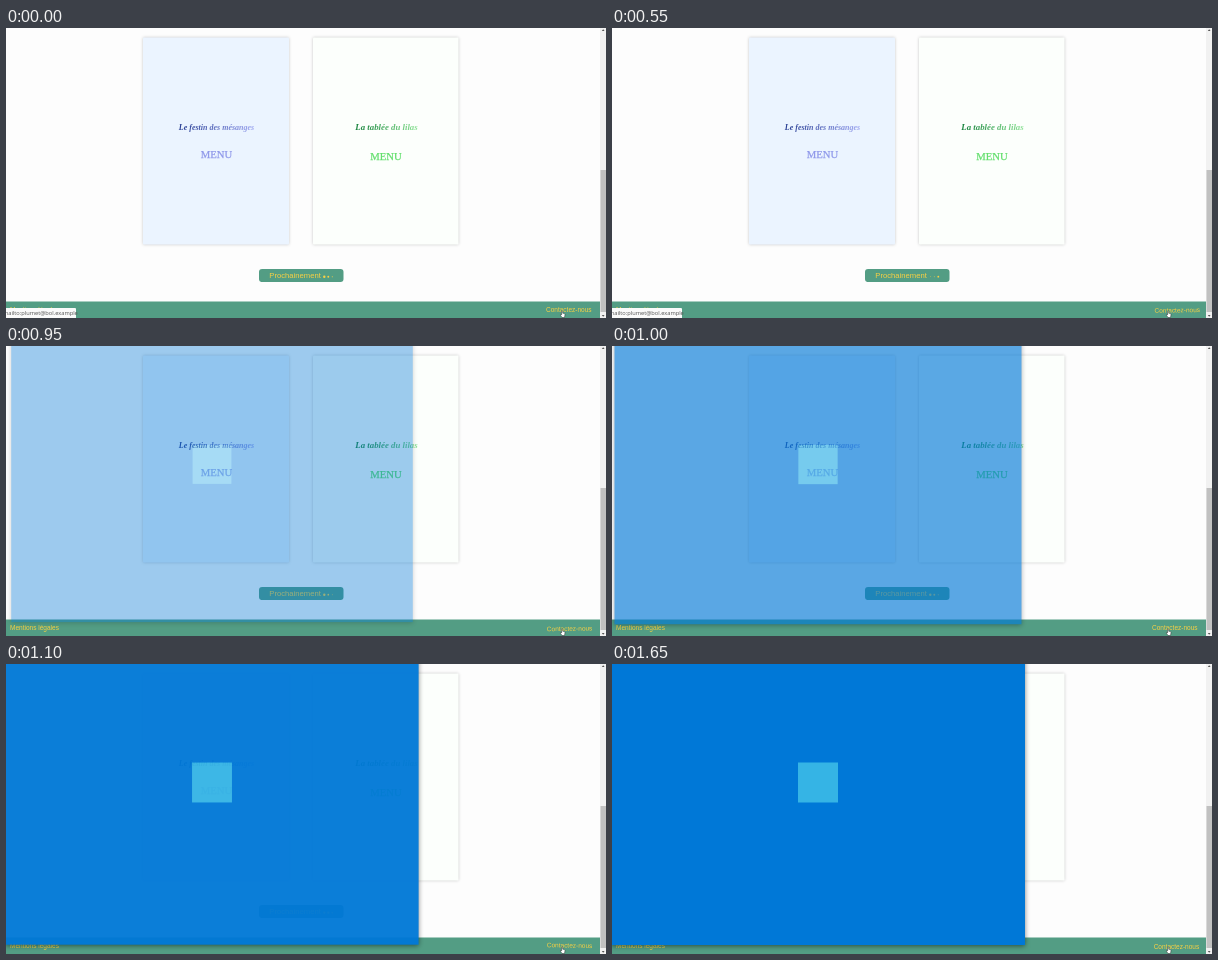
These frames come from a looping animation (600 by 290 pixels, 1700 ms). An HTML page:

```html
<!DOCTYPE html>
<html lang="fr">
<head>
<meta charset="utf-8">
<title>Menus</title>
<style>
  html, body { margin: 0; width: 100%; height: 100%; overflow: hidden; background: #fdfdfd; }
  svg { display: block; }
  text { font-family: "Liberation Sans", Arial, sans-serif; }
  .label { fill: #f8d043; }
  .name { font: italic bold 8px "Liberation Serif", serif; text-anchor: middle; }
  .menu { font: 10.7px "Liberation Serif", serif; text-anchor: middle; stroke-width: .25; }
  .card { filter: drop-shadow(0 0 1.5px rgba(0, 0, 0, .22)); }
  #popup rect:first-child { filter: drop-shadow(0 1px 2.5px rgba(0, 0, 0, .5)); }
</style>
</head>
<body>
<svg width="600" height="290" viewBox="0 0 600 290">
  <defs>
    <linearGradient id="blue"><stop stop-color="#263c91"/><stop offset="1" stop-color="#a0a9f2"/></linearGradient>
    <linearGradient id="green"><stop stop-color="#14803a"/><stop offset="1" stop-color="#92e59a"/></linearGradient>
  </defs>

  <rect class="card" x="137" y="9.5" width="146" height="207" rx="1" fill="#ebf4ff"/>
  <text class="name" x="210.5" y="102" fill="url(#blue)">Le festin des mésanges</text>
  <text class="menu" x="210.5" y="130" fill="#8f98ea" stroke="#8f98ea">MENU</text>

  <rect class="card" x="307" y="9.5" width="145.5" height="207" rx="1" fill="#fcfffc"/>
  <text class="name" x="380.5" y="102" style="font-size:8.8px" fill="url(#green)">La tablée du lilas</text>
  <text class="menu" x="380" y="132" fill="#62df6c" stroke="#62df6c">MENU</text>

  <rect x="253" y="241" width="84.5" height="13" rx="3" fill="#539d84"/>
  <text class="label" x="263.3" y="250" font-size="7.66">Prochainement</text>
  <g id="dots" class="label">
    <circle cx="318.3" cy="248.7"/><circle cx="322.3" cy="248.7"/><circle cx="326.3" cy="248.7"/>
  </g>

  <rect y="273.5" width="594" height="16.5" fill="#539d84"/>
  <text class="label" x="4" y="283.7" font-size="6.53">Mentions légales</text>
  <text class="label" id="contact" x="564" y="284" font-size="6.5" text-anchor="middle">Contactez-nous</text>

  <g id="status">
    <path d="M0 280H69Q70 280 70 281V290H0Z" fill="#fafafa"/>
    <text x="-3" y="287.4" font-size="5.7" style="font-family:'Open Sans',sans-serif" fill="#555">mailto:plumet@bol.example</text>
  </g>

  <g id="popup">
    <rect x="-1" y="-45" width="414" height="326" fill="#0078d7"/>
    <rect x="186" y="98.5" width="40" height="40" fill="#35b4e5"/>
  </g>

  <rect x="594" width="6" height="290" fill="#f1f1f1"/>
  <rect x="594.5" y="142" width="5.5" height="142" fill="#c1c1c1"/>
  <path d="M595.8 3l1.4-1.8 1.4 1.8zM595.8 287l1.4 1.8 1.4-1.8z" fill="#555"/>
  <path d="M555.6 283.2q.7-.6 1.1 0v2l1.7.4q.8.3.6 1.2l-.5 2.7h-2.5l-1.6-2.4q0-.8.8-.5l.4.4z"
        fill="#fff" stroke="#222" stroke-width=".45"/>
</svg>
<script>
const LOOP = 1700, STEP = 50;
const $ = id => document.getElementById(id);
const dots = [...$("dots").children];

// Ten poses of the hover shake: x, y, degrees
const shake = [[1, 1, 0], [-1, -2, -1], [-3, 0, 1], [3, 2, 0], [1, -1, 1],
               [-1, 2, -1], [-3, 1, 0], [3, 1, -1], [-1, -1, 1], [1, 2, 0]];

const clamp = v => Math.min(1, Math.max(0, v));

function draw(t) {
  const [x, y, angle] = shake[(t / STEP + 6) % 10];
  $("contact").setAttribute("transform",
    `translate(${x * .42} ${y * .42}) rotate(${angle} 564 282)`);

  dots.forEach((dot, i) => {
    const wave = .5 + .5 * Math.cos(t / 1000 * 2 * Math.PI - i * 1.1);
    dot.setAttribute("r", .35 + .85 * wave);
  });

  $("status").setAttribute("opacity", t < 850 ? 1 : clamp((910 - t) / 100));

  // The window fades in while growing from its centre
  const left = clamp((1150 - t) / 250);
  const scale = 1 - .047 * left ** 2;
  const opacity = t < 950 ? 0 : 1 - .9 * left ** 2 - .06 * left;
  $("popup").setAttribute("opacity", opacity);
  $("popup").setAttribute("transform",
    `translate(206 118) scale(${scale}) translate(-206 -118)`);
}

const start = performance.now();
function frame() {
  const t = (performance.now() - start) % LOOP;
  draw(Math.floor(t / STEP) * STEP);
  requestAnimationFrame(frame);
}
frame();
</script>
</body>
</html>
```
